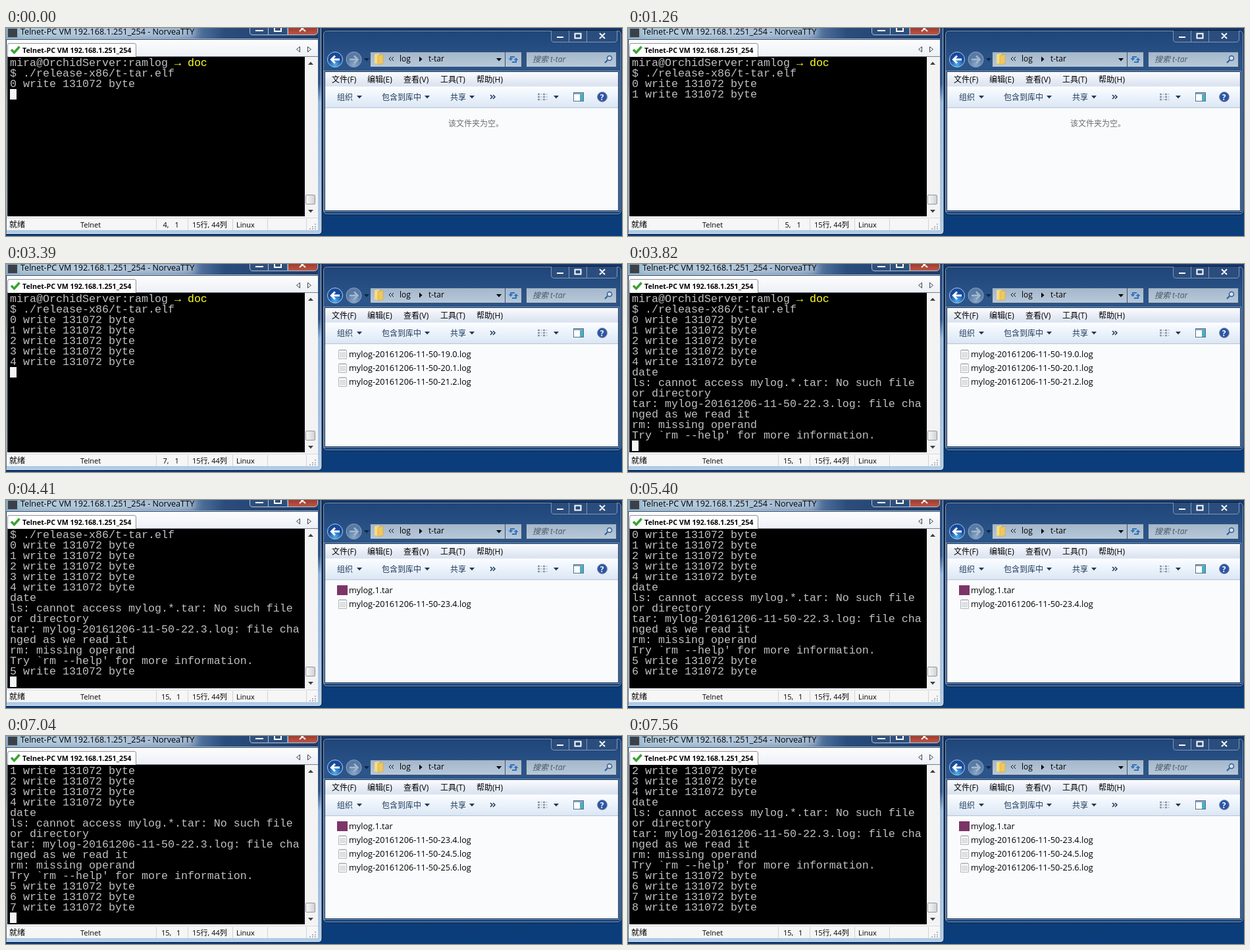
An HTML page for the animation above (8 s loop, 936 by 317 pixels).

```html
<!DOCTYPE html>
<html lang="zh">
<head>
<meta charset="utf-8">
<style>
html, body { margin: 0; width: 100%; height: 100%; overflow: hidden; background: #0c3a73; }
svg { display: block; width: 936px; height: 317px; }
text { font: 12px "Open Sans", "Noto Sans CJK SC", "Noto Sans CJK", sans-serif; white-space: pre; }
#terminal text { font: 16.66px "Liberation Mono", monospace; fill: #c0c0c0; }
#terminal .dir { fill: #ffff20; }
#status text { font-size: 11px; }
#files text { font-size: 12.7px; }
#toolbar { fill: #1e395b; }
</style>
</head>
<body>
<svg viewBox="0 0 936 317">
  <defs>
    <linearGradient id="desktop" x2="0" y2="1"><stop stop-color="#173a6c"/><stop offset="1" stop-color="#0a3d7b"/></linearGradient>
    <linearGradient id="caption"><stop stop-color="#86acc4"/><stop offset=".3" stop-color="#8fabc8"/><stop offset=".55" stop-color="#6f90b6"/><stop offset=".7" stop-color="#2b4d7c"/><stop offset="1" stop-color="#1b3b6b"/></linearGradient>
    <linearGradient id="edge" x2="0" y2="1"><stop stop-color="#274a7a"/><stop offset=".27" stop-color="#35598a"/><stop offset=".36" stop-color="#94b6d8"/><stop offset="1" stop-color="#b0cbe6"/></linearGradient>
    <linearGradient id="glass" x2="0" y2="1"><stop stop-color="#1f4579"/><stop offset=".18" stop-color="#2c5589"/><stop offset="1" stop-color="#17467f"/></linearGradient>
    <linearGradient id="field" x2="0" y2="1"><stop stop-color="#a4b7cb"/><stop offset="1" stop-color="#b7c8d9"/></linearGradient>
    <linearGradient id="menuFill" x2="0" y2="1"><stop stop-color="#fbfcfe"/><stop offset=".5" stop-color="#e8edf6"/><stop offset="1" stop-color="#d8e1f0"/></linearGradient>
    <linearGradient id="toolFill" x2="0" y2="1"><stop stop-color="#fbfdff"/><stop offset=".5" stop-color="#eaf2fb"/><stop offset="1" stop-color="#dce7f4"/></linearGradient>
    <linearGradient id="tabsFill" x2="0" y2="1"><stop stop-color="#fdfdfe"/><stop offset="1" stop-color="#eceff5"/></linearGradient>
    <linearGradient id="thumb"><stop stop-color="#fafafa"/><stop offset="1" stop-color="#cfd1d4"/></linearGradient>
    <linearGradient id="red" x2="0" y2="1"><stop stop-color="#9c3c30"/><stop offset="1" stop-color="#bf5844"/></linearGradient>
    <radialGradient id="blueBall" cy=".85"><stop stop-color="#4bb2f0"/><stop offset="1" stop-color="#174a9c"/></radialGradient>
    <radialGradient id="grayBall" cy=".85"><stop stop-color="#8fa9c6"/><stop offset="1" stop-color="#587aa4"/></radialGradient>
    <filter id="glow" x="-10%" y="-80%" width="120%" height="260%"><feGaussianBlur stdDeviation="6"/></filter>
    <path id="drop" d="M-4-2H4L0 2.5Z"/>
    <g id="page">
      <path d="M.5 1.5h12v13h-12z" fill="#f8f8f8" stroke="#b3b6ba"/>
      <path d="M2 5.5h9M2 7.5h9M2 9.5h9M2 11.5h9" stroke="#c3c9d0"/>
      <path d="M2.5 0v2M4.500 0v2M6.500 0v2M8.500 0v2M10.500 0v2" stroke="#a5a9ae"/>
    </g>
    <g id="archive"><rect x="-2" width="16" height="15" fill="#7b3567"/></g>
  </defs>

  <rect width="936" height="317" fill="url(#desktop)"/>

  <g id="terminalWindow">
    <path d="M0 0H480V309Q480 314.500 474 314.500H0Z" fill="url(#edge)" stroke="#101f36"/>
    <path d="M478.500 0V308Q478.500 313 474 313H0" fill="none" stroke="#d0e2f2" opacity=".7"/>
    <rect width="474" height="18" fill="url(#caption)"/>
    <rect x="18" y="-2" width="270" height="16" fill="#dbe7f0" opacity=".6" filter="url(#glow)"/>
    <rect x="3" y="1" width="14" height="13" fill="#3c4147"/>
    <text x="22" y="10" style="font-size:12.6px">Telnet-PC VM 192.168.1.251_254 - NorveaTTY</text>
    <g stroke="#b3c5d9">
      <path d="M370.500 0V6Q370.500 10.500 375 10.500H428V0M398.500 0V10" fill="#2f4f7b"/>
      <path d="M428.500 0V10.500H468Q473.500 10.500 473.500 5V0" fill="url(#red)"/>
    </g>
    <path d="M379 4H391M408 0V5H418V0M446-3L455 5M455-3L446 5" fill="none" stroke="#fff" stroke-width="2"/>
    <path d="M1 18H474V308H1Z" fill="#f6f6f7"/>
    <path d="M1 18H474V44H1Z" fill="url(#tabsFill)"/>
    <path d="M0 16.500H474" stroke="#a9c0d8"/>
    <path d="M0 17.500H474" stroke="#3b4b60"/>
    <path d="M0 43.500H474" stroke="#777f8b"/>
    <path d="M2.500 44V26Q2.500 23.500 5 23.500H195Q197.500 23.500 197.500 26V44" fill="#fff" stroke="#8b929d"/>
    <path d="M8 33L12.500 37.500L20.500 28.500" fill="none" stroke="#37a32d" stroke-width="3.500"/>
    <text x="25" y="38" style="font-size:10.7px;font-weight:700">Telnet-PC VM 192.168.1.251_254</text>
    <path d="M446.500 28.500V36.500L441.500 32.500ZM458.500 28.500V36.500L463.500 32.500Z" fill="none" stroke="#3d4653"/>
    <rect x="2" y="44" width="452" height="243" fill="#000"/>
    <rect x="454" y="44" width="19" height="243" fill="#f3f3f3"/>
    <path d="M459 56L463 51.500L467 56ZM459 277L463 281.500L467 277Z" fill="#3d4147"/>
    <rect x="455.500" y="254.500" width="14" height="14" rx="1.500" fill="url(#thumb)" stroke="#92969b"/>
    <g id="terminal"></g>
    <rect id="cursor" x="6" width="10" height="16" fill="#f4f4f4"/>
    <g id="status">
      <path d="M1 289.500H474" stroke="#d5d7da"/>
      <path d="M228.500 291V308M276.500 291V308M344.500 291V308M397.500 291V308M456.500 291V308" stroke="#d2d3d5"/>
      <text x="5" y="304" style="font-size:12px">就绪</text>
      <text x="113" y="304">Telnet</text>
      <text id="row" y="304"></text>
      <text id="column" y="304">1</text>
      <text x="283" y="304">15行, 44列</text>
      <text x="350" y="304">Linux</text>
      <path d="M470 298v2M470 302v2M466 302v2M470 305v2M466 305v2M462 305v2" stroke="#b4b6b9" stroke-width="2"/>
    </g>
  </g>

  <g id="explorerWindow">
    <rect x="481.500" y="3.500" width="454" height="281" rx="6" fill="url(#glass)" stroke="#0c1c36"/>
    <rect x="482.500" y="4.500" width="452" height="279" rx="5" fill="none" stroke="#7d9abf"/>
    <path d="M828.500 4V17Q828.500 21.500 833 21.500H924Q928.500 21.500 928.500 17V4M855.500 4V21M882.500 4V21" fill="#2b4d7d" stroke="#7e98b8"/>
    <path d="M837 14H847M864.500 8.500H873.500V15.500H864.500ZM902 8L910 16M910 8L902 16" fill="none" stroke="#fff" stroke-width="2"/>
    <circle cx="528.500" cy="48" r="11.500" fill="url(#grayBall)" stroke="#8ba6c6"/>
    <circle cx="500" cy="48" r="11.500" fill="url(#blueBall)" stroke="#b6cde6"/>
    <path d="M507 48H495M500 42.500L494.500 48L500 53.500" fill="none" stroke="#fff" stroke-width="3"/>
    <path d="M522 48H534M529 42.500L534.500 48L529 53.500" fill="none" stroke="#a3b9d1" stroke-width="2.500"/>
    <use href="#drop" x="548" y="48" fill="#102443"/>
    <path d="M553.500 36.500H783.500V59.500H553.500ZM758.500 36.500V59.500" fill="url(#field)" stroke="#3a5575"/>
    <path d="M560 40L567 39V55L560 54Z" fill="#f7dc82"/>
    <path d="M565 42L573 40V54L565 56Z" fill="#efc75c" stroke="#d3a63e" stroke-width=".6"/>
    <path d="M585 44L582 47L585 50M589 44L586 47L589 50" fill="none" stroke="#111"/>
    <text x="598" y="51">log</text>
    <path d="M628 43.500L632.500 47.500L628 51.500Z"/>
    <text x="642" y="51">t-tar</text>
    <use href="#drop" x="749" y="48"/>
    <path d="M767 48V44H773M775 47V52H769" fill="none" stroke="#2f74c0" stroke-width="2"/>
    <path d="M763.500 46H770.500L767 50ZM771.500 49H778.500L775 45Z" fill="#2f74c0"/>
    <rect x="790.500" y="36.500" width="137" height="23" fill="url(#field)" stroke="#3a5575"/>
    <text x="800" y="52" fill="#4d5865" style="font-style:italic">搜索 t-tar</text>
    <circle cx="917" cy="46" r="3.500" fill="#d6e5f2" stroke="#2d5a94" stroke-width="1.500"/>
    <path d="M914 49L910 53" stroke="#2d5a94" stroke-width="2"/>

    <rect x="483.500" y="65.500" width="448" height="214" fill="none" stroke="#7f9cc0"/>
    <rect x="484.500" y="66.500" width="446" height="212" fill="#fafbfc" stroke="#0f2748"/>
    <rect x="485" y="67" width="445" height="23" fill="url(#menuFill)"/>
    <rect x="485" y="90" width="445" height="31" fill="url(#toolFill)"/>
    <path d="M485 89.500H930" stroke="#f4f7fb"/>
    <path d="M485 121.500H930" stroke="#b4c4d8"/>
    <text x="495" y="83">文件(F)</text>
    <text x="549" y="83">编辑(E)</text>
    <text x="604" y="83">查看(V)</text>
    <text x="660" y="83">工具(T)</text>
    <text x="715" y="83">帮助(H)</text>
    <g id="toolbar">
      <text x="503" y="110">组织</text><use href="#drop" x="537" y="105"/>
      <text x="571" y="110">包含到库中</text><use href="#drop" x="640" y="105"/>
      <text x="675" y="110">共享</text><use href="#drop" x="708" y="105"/>
      <path d="M736 102L739 105L736 108M740 102L743 105L740 108" fill="none" stroke="#1e395b" stroke-width="1.500"/>
      <use href="#drop" x="836" y="105"/>
    </g>
    <path d="M808 101h3M808 105h3M808 109h3M816 101h3M816 105h3M816 109h3" stroke="#8796a8" stroke-width="2.500"/>
    <path d="M812 101h3M812 105h3M812 109h3M820 101h3M820 105h3M820 109h3" stroke="#a9b5c3"/>
    <rect x="862.500" y="98.500" width="15" height="13" fill="#fff" stroke="#526f8d"/>
    <path d="M863 100H877" stroke="#86a3bf" stroke-width="2"/>
    <rect x="872" y="101" width="5" height="10" fill="#4ab0bd"/>
    <circle cx="906" cy="105" r="7.500" fill="#2d55a5" stroke="#8b98aa"/>
    <text x="902.800" y="109.500" fill="#fff" style="font-weight:700">?</text>
    <text id="empty" x="672" y="150" fill="#6d6d6d">该文件夹为空。</text>
    <g id="files"></g>
  </g>
</svg>
<script>
const LOOP = 8000, ROW_HEIGHT = 16, VISIBLE_ROWS = 14;
const $ = id => document.getElementById(id);
const write = n => `${n} write 131072 byte`;
const logFile = n => `mylog-20161206-11-50-${19 + n}.${n}.log`;

const output = [
  'mira@OrchidServer:ramlog <tspan class="dir">→ doc</tspan>',
  '$ ./release-x86/t-tar.elf',
  ...[0, 1, 2, 3, 4].map(write),
  'date',
  'ls: cannot access mylog.*.tar: No such file',
  'or directory',
  'tar: mylog-20161206-11-50-22.3.log: file cha',
  'nged as we read it',
  'rm: missing operand',
  "Try `rm --help' for more information.",
  ...[5, 6, 7, 8].map(write)
];

// Each track lists [start time in ms, value].
const tracks = {
  lines: [[0, 3], [430, 4], [1380, 5], [2370, 6], [3390, 7], [3670, 14], [4410, 15], [5400, 16], [6360, 17], [7440, 18]],
  cursor: [[0, 1], [150, 0], [430, 1], [1260, 0], [1380, 1], [5400, 0], [5960, 1], [6480, 0], [7040, 1], [7560, 0]],
  row: [[0, 4], [700, 5], [1810, 6], [2770, 7], [3670, 8], [3820, 15]],
  files: [
    [0, []],
    [1380, [0, 1].map(logFile)],
    [2370, [0, 1, 2].map(logFile)],
    [4410, ['mylog.1.tar', logFile(4)]],
    [6360, ['mylog.1.tar', logFile(4), logFile(5)]],
    [6910, ['mylog.1.tar', logFile(4), logFile(5), logFile(6)]]
  ]
};
const valueAt = (track, time) => track.findLast(([start]) => start <= time)[1];

function drawTerminal(lines, cursorOn, row) {
  const first = Math.max(0, lines - VISIBLE_ROWS);
  $('terminal').innerHTML = output.slice(first, lines)
    .map((line, i) => `<text x="6" y="${58 + i * ROW_HEIGHT}">${line}</text>`).join('');
  $('cursor').setAttribute('y', 45 + (lines - first) * ROW_HEIGHT);
  $('cursor').setAttribute('visibility', cursorOn ? 'visible' : 'hidden');
  $('row').textContent = row + ',';
  $('row').setAttribute('x', row > 9 ? 236 : 238.5);
  $('column').setAttribute('x', row > 9 ? 259 : 256.5);
}

function drawFiles(files) {
  $('empty').setAttribute('visibility', files.length ? 'hidden' : 'visible');
  $('files').innerHTML = files.map((name, i) => {
    const icon = name.endsWith('.tar') ? 'archive' : 'page';
    return `<use href="#${icon}" x="505" y="${130 + i * 21}"/><text x="521" y="${142 + i * 21}">${name}</text>`;
  }).join('');
}

let previous = '';
function render(now) {
  const time = now % LOOP;
  const [lines, cursor, row, files] = Object.values(tracks).map(track => valueAt(track, time));
  const state = [lines, cursor, row, files].join();
  if (state !== previous) {
    drawTerminal(lines, cursor, row);
    drawFiles(files);
    previous = state;
  }
}

const startTime = performance.now();
function tick() {
  render(performance.now() - startTime);
  requestAnimationFrame(tick);
}
tick();
</script>
</body>
</html>
```
